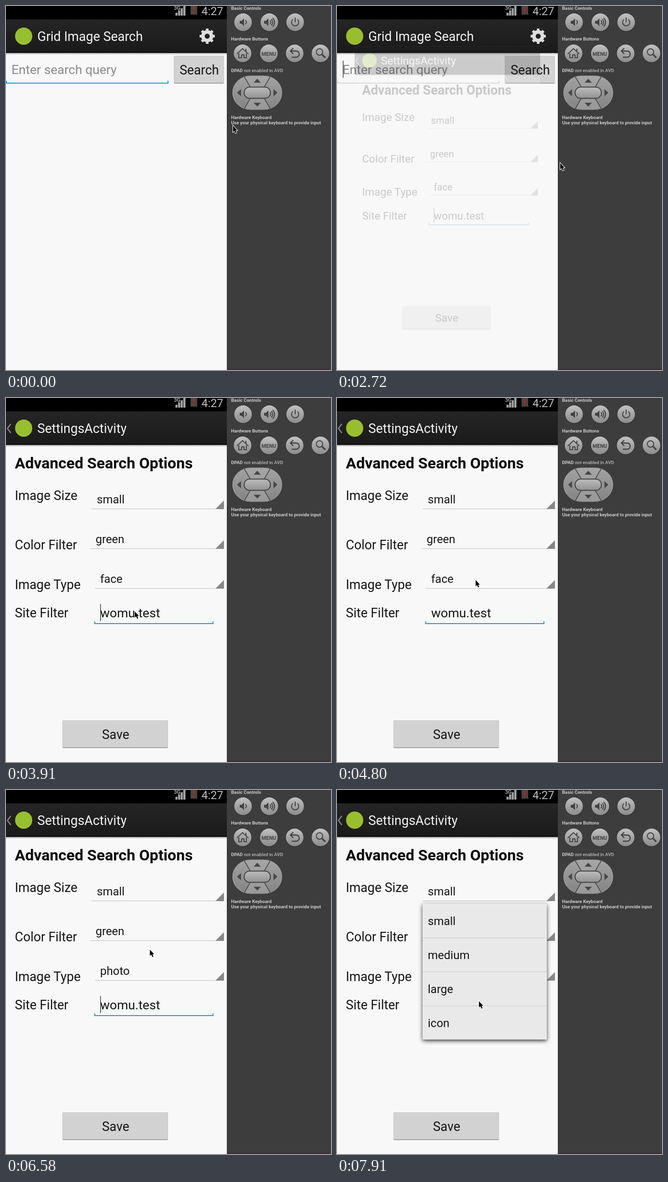
Write an HTML page that moves like this. It is 680 px wide and 760 px high and loops after 8 s.

```html
<!DOCTYPE html>
<html lang="en">
<head>
<meta charset="utf-8">
<title>Search settings</title>
<style>
  html, body { margin: 0; width: 100%; height: 100%; overflow: hidden; background: #3d3d3d; }
  svg { display: block; width: 680px; height: 760px; font-family: Roboto, sans-serif; }
  text { white-space: pre; }
</style>
</head>
<body>
<svg id="stage" viewBox="0 0 680 760"></svg>
<script>
const LOOP = 8000;
const INK = '#161616';
const BLUE = '#259dca';
const ICON = '#424242';
const ROW = 71;

const text = (x, y, size, str, fill = INK, extra = '') =>
  `<text x="${x}" y="${y}" font-size="${size}" fill="${fill}" ${extra}>${str}</text>`;
const rect = (x, y, w, h, fill, extra = '') =>
  `<rect x="${x}" y="${y}" width="${w}" height="${h}" fill="${fill}" ${extra}/>`;
const path = (d, fill, extra = '') => `<path d="${d}" fill="${fill}" ${extra}/>`;
const line = (d, color, width, extra = '') =>
  path(d, 'none', `stroke="${color}" stroke-width="${width}" ${extra}`);
const repeat = (count, make) => Array.from({ length: count }, (_, i) => make(i)).join('');

const gradient = (id, ...stops) =>
  `<linearGradient id="${id}" x2="0" y2="1">${stops.map((color, i) =>
    `<stop offset="${i / (stops.length - 1)}" stop-color="${color}"/>`).join('')}</linearGradient>`;

const defs = `<defs>
  ${gradient('bar', '#252525', '#1a1a1a')}
  ${gradient('barShadow', '#a8a8a8', '#f8f8f8')}
  ${gradient('key', '#c2c2c2', '#a4a4a4', '#8c8c8c')}
  ${gradient('pad', '#a2a2a2', '#848484')}
  ${gradient('pill', '#bdbdbd', '#929292')}
  <filter id="shade" x="-10%" y="-10%" width="120%" height="120%">
    <feDropShadow dx="0" dy="3" stdDeviation="4.5" flood-opacity=".75"/>
  </filter>
</defs>`;

// Phone parts
const actionBar = title => rect(0, 28, 462, 70, 'url(#bar)') + rect(0, 96, 462, 2, '#0d0d0d')
  + rect(0, 98, 462, 4, 'url(#barShadow)')
  + '<circle cx="37" cy="63" r="18" fill="#97bf2d"/>'
  + text(65.5, 73, 27, title, '#f2f2f2');

const button = (x, y, w, h, label) => rect(x, y, w, h, '#d2d2d2', 'rx="1.5"')
  + rect(x + .5, y + .5, w - 1, h - 1, 'none', 'rx="1.5" stroke="#c8c8c8"')
  + rect(x + 1, y + h - 1.5, w - 2, 1.5, '#939393')
  + text(x + w / 2 + .8, y + 39, 26.8, label, INK, 'text-anchor="middle"');

const field = (id, x1, x2, y) =>
  line(`M${x1} ${y - 5}V${y}H${x2}V${y - 5}`, BLUE, 2, `id="${id}"`);

const caret = (id, x, y) => rect(x, y, 1.6, 36, '#4c4c4c', `id="${id}"`);

const spinner = (id, x, y, value) =>
  rect(x, y - 41, 456 - x, 41, 'rgba(0,0,0,.14)', `id="${id}Press"`)
  + rect(x, y - 1, 456 - x, 1, '#bdbdbd')
  + path(`M456 ${y - 18}V${y}H438Z`, '#878787')
  + text(x + 11, y - 12, 24, value, INK, `id="${id}Value"`);

const menu = (id, x, y, items) => `<g id="${id}Menu">`
  + rect(x, y, 439 - x, ROW * items.length, '#e9e9e9', 'rx="2" filter="url(#shade)"')
  + rect(x, y + ROW, 439 - x, ROW, 'rgba(0,0,0,.14)', `id="${id}ItemPress"`)
  + items.map((item, i) => text(x + 11, y + 45 + ROW * i, 24, item)
    + (i ? rect(x, y + ROW * i, 439 - x, 1, '#cecece') : '')).join('') + '</g>';

const statusBar = rect(0, 0, 462, 28, '#000')
  + repeat(4, i => rect(354.5 + 5.5 * i, 14 - 4.7 * i, 4.5, 6 + 4.7 * i, '#a2a2a2'))
  + text(351.5, 7.5, 11, '3G', '#c2c2c2', 'font-weight="500" stroke="#000" stroke-width="2" paint-order="stroke"')
  + rect(386, 0, 14, 18, '#454545') + line('M392.7 1V12M392.7 13.5V16', '#a8291b', 3)
  + text(409, 19, 23.7, '4:27', '#bdbdbd');

const gear = `<g transform="translate(421 63)" fill="none" stroke="#dedede">
  <circle r="9" stroke-width="7.5"/>
  <circle r="13.7" stroke-width="4.6" pathLength="16" stroke-dasharray="1" stroke-dashoffset=".5"/></g>`;

const home = rect(0, 28, 462, 732, '#f8f8f8') + actionBar('Grid Image Search')
  + rect(380, 28, 82, 68, 'rgba(255,255,255,.18)', 'id="gearPress"') + gear
  + text(11.5, 142, 26.6, 'Enter search query', '#8a8a8a') + caret('queryCaret', 12, 114)
  + field('queryLine', 1, 339, 161) + button(351, 104, 105, 58, 'Search');

const settings = '<g id="settings">' + rect(0, 28, 462, 732, '#f8f8f8') + actionBar('SettingsActivity')
  + line('M10 54L3 63.5L10 73', '#858585', 2.5)
  + text(18.5, 147, 32.15, 'Advanced Search Options', '#0c0c0c', 'font-weight="700"')
  + text(18.5, 213, 26.8, 'Image Size') + text(18.5, 316, 26.8, 'Color Filter')
  + text(18.5, 399, 26.8, 'Image Type') + text(18.5, 458, 26.8, 'Site Filter')
  + spinner('size', 179, 232, 'small') + spinner('color', 176.5, 315, 'green')
  + spinner('type', 186, 398, 'face')
  + text(197, 458, 26.6, 'womu.test') + caret('siteCaret', 197, 430)
  + field('siteLine', 185.5, 433, 471) + button(118, 673, 221, 58, 'Save')
  + menu('type', 186, 402, ['face', 'photo', 'clipart', 'lineart'])
  + menu('size', 179, 237, ['small', 'medium', 'large', 'icon']) + '</g>';

// Emulator controls
const label = (y, str) => text(471, y, 9.6, str, '#cbcbcb', 'font-weight="700"');
const key = (x, y, icon) => `<g transform="translate(${x} ${y})">
  <circle cy="1" r="19" fill="#313131"/><circle r="18.4" fill="url(#key)"/>
  <g fill="none" stroke="${ICON}" stroke-width="2">${icon}</g></g>`;
const speaker = waves => path('M-7 -3H-3L2 -8V8L-3 3H-7Z', ICON, 'stroke="none"')
  + repeat(waves, i => `<path d="M${5 + 3 * i} ${-4 - 2.5 * i}q${4 + 2 * i} ${4 + 2.5 * i} 0 ${8 + 5 * i}"/>`);
const quarters = make => [[1, 1], [-1, 1], [1, -1], [-1, -1]].map(([sx, sy]) =>
  `<g transform="scale(${sx} ${sy})">${make}</g>`).join('');
const arrow = (angle, distance) =>
  path('M-7.5 4H7.5L0 -4Z', '#454545', `transform="rotate(${angle}) translate(0 ${-distance})"`);

const dpad = '<g transform="translate(525.7 181)">'
  + rect(-51.5, -35, 103, 70, 'url(#pad)', 'rx="37" ry="35" stroke="#adadad"')
  + quarters(path('M0 -35Q14 -35 26 -32L14 -11H0Z', '#a6a6a6', 'opacity=".6"')
    + line('M27 -33L14 -11', '#474747', 1.6))
  + rect(-27.5, -11.8, 55, 23.6, 'url(#pill)', 'rx="11.8" stroke="#414141" stroke-width="2"')
  + arrow(0, 25) + arrow(180, 25) + arrow(90, 38) + arrow(270, 38) + '</g>';

const controls = rect(462, 0, 218, 760, '#3d3d3d') + rect(462, 757, 218, 3, '#3b3138')
  + label(8, 'Basic Controls') + label(72, 'Hardware Buttons')
  + label(137.5, 'DPAD <tspan fill="#a6a6a6">not enabled in AVD</tspan>')
  + label(236, 'Hardware Keyboard') + label(247, 'Use your physical keyboard to provide input')
  + key(496, 34, speaker(1))
  + key(551, 34, `<g transform="translate(-4)">${speaker(3)}</g>`)
  + key(605, 34, '<path d="M-4.5 -6A7.5 7.5 0 1 0 4.5 -6M0 -10V0"/>')
  + key(495, 99, '<path d="M-12 1L0 -10L12 1M-8 0V9H-2V3H3V9H8V0M7 -5V-10"/>')
  + key(550, 99, text(0, 4.5, 10.8, 'MENU', ICON, 'stroke="none" text-anchor="middle" font-weight="700"'))
  + key(604, 99, '<path d="M-3 -11L-9 -5L-3 1M-9 -5H3A6.5 6.5 0 0 1 3 8H-6" stroke-width="2.4"/>')
  + key(658, 99, '<circle cx="-2" cy="-3" r="6.7"/><path d="M3 2L10 9" stroke-width="3.2"/>')
  + dpad;

const pointer = path('M0 0V13L3 10.4L5.2 15.5L7.4 14.6L5.3 9.6H9Z', '#000',
  'id="pointer" stroke="#fff" stroke-width="2" paint-order="stroke"');

const stage = document.getElementById('stage');
stage.innerHTML = defs + home + settings + statusBar + controls + pointer;
const part = id => document.getElementById(id);
const show = (id, on) => { part(id).style.display = on ? '' : 'none'; };
const setFocus = (id, on) => {
  part(id).setAttribute('stroke', on ? BLUE : '#b4b4b4');
  part(id).setAttribute('stroke-width', on ? 2 : 1);
};

// Resting points of the pointer, eased in between
const stops = [
  { t: 0, x: 475, y: 250 }, { t: 330, x: 505, y: 222 }, { t: 770, x: 421, y: 64 },
  { t: 1370, x: 467, y: 328 }, { t: 2720, x: 467, y: 328 }, { t: 3010, x: 508, y: 262 },
  { t: 3310, x: 440, y: 225 }, { t: 3910, x: 269, y: 446 }, { t: 4800, x: 290, y: 380 },
  { t: 5250, x: 290, y: 380 }, { t: 5690, x: 276, y: 506 }, { t: 5980, x: 276, y: 506 },
  { t: 6580, x: 301, y: 333 }, { t: 7020, x: 297, y: 212 }, { t: 7320, x: 297, y: 212 },
  { t: 7910, x: 297, y: 441 }
];

const clamp = v => Math.min(1, Math.max(0, v));
const smooth = p => p * p * (3 - 2 * p);
const easeOut = p => 1 - (1 - p) ** 2;
const mix = (a, b, p) => a + (b - a) * p;
const within = (t, from, to) => t >= from && t < to;

function pointerAt(t) {
  const next = stops.find(stop => stop.t > t);
  if (!next) return stops.at(-1);
  const last = stops[stops.indexOf(next) - 1];
  const p = smooth((t - last.t) / (next.t - last.t));
  return { x: mix(last.x, next.x, p), y: mix(last.y, next.y, p) };
}

const STEP = 148.6;
const START = 32;
const sampled = t => Math.max(0, START + Math.floor((t - START) / STEP) * STEP);

function draw(time) {
  const t = sampled(time);
  const { x, y } = pointerAt(t);
  part('pointer').setAttribute('transform', `translate(${x} ${y})`);

  const opening = easeOut(clamp((t - 2675) / 300));
  part('settings').setAttribute('opacity', opening);
  part('settings').setAttribute('transform',
    `translate(231 382) scale(${mix(.8, 1, opening)}) translate(-231 -382)`);

  const typeOpen = within(t, 5200, 6100);
  const sizeOpen = t > 7440;
  show('gearPress', within(t, 750, 900));
  show('typePress', within(t, 4900, 5200));
  show('typeMenu', typeOpen);
  show('typeItemPress', within(t, 5800, 6100));
  show('sizePress', within(t, 7000, 7150));
  show('sizeMenu', sizeOpen);
  show('sizeItemPress', false);
  show('colorPress', false);
  show('queryCaret', t > 450);
  show('siteCaret', (t + 1080) % 1200 < 600);
  setFocus('queryLine', t < 900);
  setFocus('siteLine', !typeOpen && !sizeOpen);
  part('typeValue').textContent = t < 5950 ? 'face' : 'photo';
}

const begin = performance.now();
function tick() {
  draw((performance.now() - begin) % LOOP);
  requestAnimationFrame(tick);
}
tick();
</script>
</body>
</html>
```
